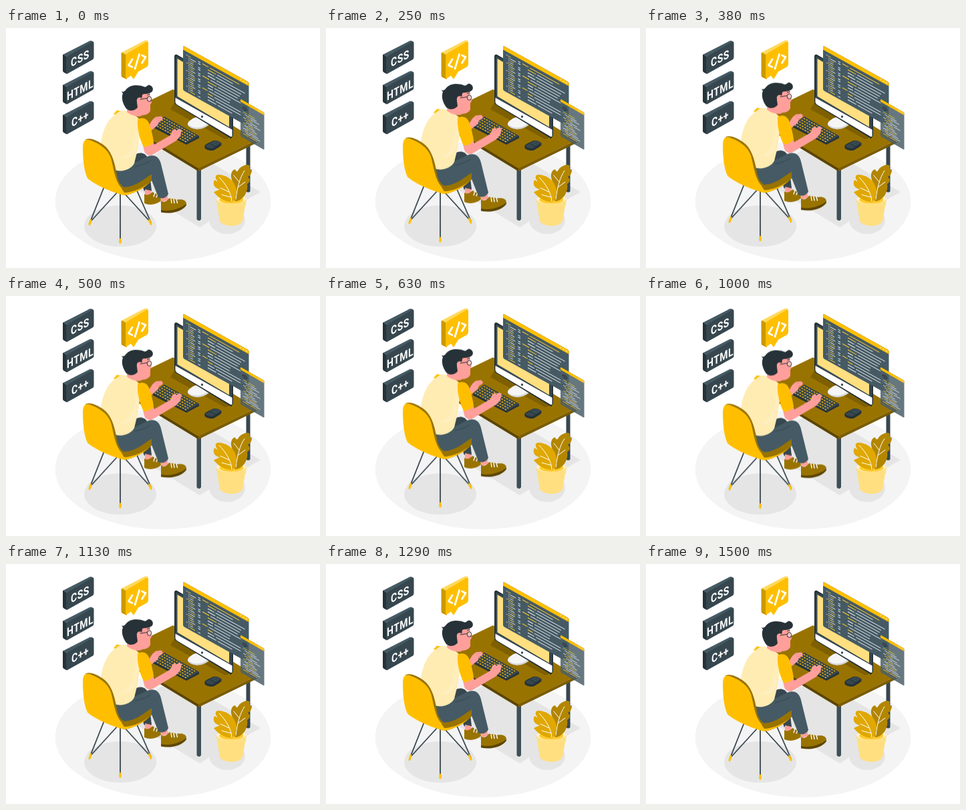
These frames come from a looping animation (470 px wide and 360 px high, 1.54 s). An HTML page:

```html
<!DOCTYPE html>
<html lang="en">
<head>
<meta charset="utf-8">
<title>Developer at a desk</title>
<style>
  html, body { margin: 0; width: 100%; height: 100%; overflow: hidden; background: #fff; }
  svg { display: block; width: 100vw; height: 100vh; }
  text { font: 700 17.500px Roboto, sans-serif; letter-spacing: .6px; fill: #fff; text-anchor: middle; }
  .line { fill: none; stroke-linecap: round; stroke-linejoin: round; }
  .skin { fill: #ff9f9b; }
  #sitter { animation: bob 1540ms -50ms infinite cubic-bezier(.37, 0, .63, 1); }
  @keyframes bob {
    0%, 100% { transform: translateY(0); }
    50% { transform: translateY(-6.5px); }
  }
</style>
</head>
<body>
<svg viewBox="0 0 470 360">
  <defs>
    <g id="tag">
      <path fill="#263238" d="M85 40.500Q85 39 87 40L91 43V69L86.500 66.500Q85 65.500 85 64Z"/>
      <path fill="#455a64" d="M86 39.500L125 19.500Q128 18 131 21L91 43Z"/>
      <path fill="#37474f" d="M90 45Q90 43 92 42L129 21Q131.500 20 131.500 22.500V44Q131.500 46.500 129.500 47.500L92 68.500Q90 69.500 90 67Z"/>
    </g>
  </defs>

  <g id="floor">
    <ellipse cx="235" cy="260" rx="161.500" ry="90" fill="#f4f4f4"/>
    <g fill="#e5e5e5">
      <path d="M165 223L255 171L381 246L307 288L290 299Z"/>
      <ellipse cx="171" cy="297" rx="54" ry="31"/>
      <ellipse cx="331" cy="288" rx="27" ry="21"/>
    </g>
  </g>

  <g id="tags">
    <use href="#tag"/>
    <use href="#tag" y="45.500"/>
    <use href="#tag" y="90.500"/>
    <text transform="matrix(.8 -.42 0 1 111 51.500)">CSS</text>
    <text transform="matrix(.8 -.42 0 1 111 98.500)">HTML</text>
    <text transform="matrix(.8 -.42 0 1 111 142)">C++</text>
  </g>

  <g id="bubble">
    <path fill="#cc9900" d="M172.500 38Q172.500 36 175 37L181 40V77L174 74Q172.500 73 172.500 71Z"/>
    <path fill="#ffd95c" d="M173.500 36.500L207 19Q210 17.500 213 20L181 41Z"/>
    <path fill="#ffbf00" d="M179 42Q179 39.500 181 38.500L210 21Q213 19.500 213 22V54Q213 57 210.500 58.500L198 65.500L191 77L187 71.500L181 75.500Q179 76.500 179 74Z"/>
    <path class="line" stroke="#fff" stroke-width="2.700" d="M189 47L183.500 56L189 58.500M199.500 39.500L193 61M203.500 41L209 43.500L203.500 52.500"/>
  </g>

  <g id="desk">
    <path fill="#37474f" d="M359.500 175H365.500V245Q362.500 248 359.500 245Z"/>
    <path fill="#3e4f57" d="M285.500 205H292V287Q289 291 285.500 287Z"/>
    <path fill="#5c4500" d="M163 134L288 210V215L163 139Z"/>
    <path fill="#7a5c00" d="M288 210L375 168V172.500L288 215Z"/>
    <path fill="#997300" d="M250 92L375 168L288 210.500L163 134Z"/>
    <path fill="#7a5c00" d="M252 112L338 163L328 167L246 122Z" opacity=".8"/>
  </g>

  <g id="monitor">
    <path fill="#d5d5d5" d="M272 146Q271 142 280 137L298 133Q306 138 305 144.500Q296 152 286 152Q276 151 272 146Z"/>
    <path fill="#f5f5f5" d="M272 144Q272 140 281 135L297 130Q306 137 305 142Q294 150 285 149.500Q276 149 272 144Z"/>
    <path fill="#263238" d="M252 43Q252 39 256 40L336 87Q340 89 340 94V161L337 166L254 115Q252 113 252 110Z"/>
    <path fill="#37474f" d="M254 45Q254 42 257 43L335 89Q338 91 338 95V154L254 105Z"/>
    <path fill="#ffdf80" d="M256.500 46L334 92V148.500L256.500 102.500Z"/>
    <path fill="#fff" d="M253.500 104.500L338.500 152.500V161.500Q338 164 335.500 162.500L256 115Q253.500 113.500 253.500 111Z"/>
    <circle cx="293.500" cy="133" r="1.700" fill="#37474f"/>
  </g>

  <g id="editor" transform="matrix(1 .557 0 1 265 26.500)">
    <rect width="98.500" height="67" rx="2" fill="#455a64"/>
    <path fill="#ffbf00" d="M0 6V2Q0 0 2 0H96.500Q98.500 0 98.500 2V6Z"/>
    <path class="line" stroke="#fff" stroke-width="1.500" d="M86 3h.1M90.500 3h.1M95 3h.1"/>
  </g>

  <g id="preview" transform="matrix(1 .575 0 1 351 106.500)">
    <rect width="35.500" height="56" rx="1.500" fill="#4c6069" opacity=".85"/>
    <path fill="#ffbf00" d="M0 4V1.500Q0 0 1.500 0H34Q35.500 0 35.500 1.500V4Z"/>
    <path class="line" stroke="#fff" stroke-width="1.100" d="M27 2h.1M30 2h.1M33 2h.1"/>
    <path class="line" stroke="#263238" d="M5 9l-2 2l2 2M7 8l-1 6M8 9l2 2l-2 2"/>
  </g>

  <g id="keyboard">
    <path fill="#263238" d="M220 146L237 133L289 162V165L270 175L220 149Z"/>
    <path fill="#37474f" d="M220 146L237 133L289 162L270 172.500Z"/>
  </g>

  <g id="mouse">
    <path fill="#263238" d="M297 178Q297 176 300 174L310 169Q316 167.500 322 172Q324 175 320 178L311 183.500Q303 185 298 181Z"/>
    <path fill="#37474f" d="M298 177L310 169.500Q316 168 322 172.500L310 180Q303 181 298 177Z"/>
    <path class="line" stroke="#263238" d="M304 173L314 178"/>
  </g>

  <g id="plant">
    <path fill="#ffdf80" d="M315 257L320 290C326 299 350 299 354 290L360 256Z"/>
    <ellipse cx="337.500" cy="257" rx="22.500" ry="8" fill="#fff0c2"/>
    <ellipse cx="337.500" cy="258" rx="18" ry="5.500" fill="#ffca2c"/>
    <path fill="#b38600" d="M343 260C336 247 336 239 340 232C335 224 336 213 343 212C345 217 347 215 349 211C355 205 363 204 365 207C364 211 365 213 368 212C368 219 365 222 362 223C366 227 366 231 361 234C363 242 358 255 348 259Z"/>
    <path class="line" stroke="#fff" d="M344 257C346 240 350 224 357 214M349 231L341 221M347 239L358 231"/>
    <path fill="#e0a800" d="M331 260C322 257 315 252 311 246L320 242C311 240 309 233 312 228L318 231C312 226 313 221 317 220C330 220 341 228 344 239C347 249 343 257 339 261Z"/>
    <path class="line" stroke="#fff" d="M319 224C329 234 337 247 338 260M334 246L321 240M337 254L323 250"/>
    <path fill="#ffdf80" d="M315 258C322 266 353 266 360 257L359 266C350 274 325 274 316 266Z"/>
  </g>

  <g id="sitter">
    <g id="chair-legs" class="line" stroke="#37474f" stroke-width="1.800">
      <path d="M147 238L125.500 292M171 248V320M196 244L217 292M167 246L126 291M177 248L216 291"/>
      <path stroke="#ffbf00" stroke-width="3.200" d="M127 288.500L125 294.500M171 317V322M214.500 288.500L217 294"/>
    </g>

    <g id="far-leg">
      <path fill="#37474f" d="M188 196C194 186 206 184 212 194L218 244C214 248 209 247 206 243L202 214Z"/>
      <path class="skin" d="M208 242L217 244L218 251H208Z"/>
      <path fill="#997300" d="M207 249C211 252 216 250 219 246L231 252L232 259C224 266 214 266 207 263Z"/>
      <path class="line" stroke="#fff" stroke-width="1.300" d="M221 253L223 247M225 254L227 249"/>
    </g>

    <path id="seat" fill="#997300" d="M158 225L190 206L218 218V229C209 240 190 249 177 251Z"/>

    <g id="near-leg">
      <path class="skin" d="M231 250L241 249L243 258L233 261Z"/>
      <path fill="#997300" d="M232 259C236 263 241 260 244 255.500L258 257.500C265 256.500 270 259 270 264C267 272 249 279 232 275Z"/>
      <path fill="#5c4500" d="M232 273C246 276 261 271 270 264V266C264 275 247 280 232 276.500Z"/>
      <path class="line" stroke="#fff" stroke-width="1.400" d="M248 262.500L247 256.500M252 262.500L251 257M256.500 262.500L255 257"/>
      <path fill="#455a64" d="M160 212C174 211 193 202 207 195C219 188 229 191 232 204L243 249C240 255 234 257 228 254L215 221C204 229 192 238 177 239C168 236 162 225 160 212Z"/>
      <path class="line" stroke="#37474f" d="M193 208C203 206 211 203 216 199"/>
    </g>

    <g id="far-arm">
      <path class="skin" d="M214 146L219 138L224 133.500L232 132.500C235 134 236 137 233 138.500L229 141L227 146L216 155Z"/>
      <path class="line" stroke="#f28f8f" d="M224 136L231 135M225 139L230 139"/>
    </g>

    <g id="torso">
      <path fill="#ffbf00" d="M161 129L166 123.500L179 126L170 133Z"/>
      <path fill="#ffecb3" d="M166 128C154 135 148 147 144 162C139 181 139 193 146 205L166 214C177 216 188 211 192 203C196 188 201 165 201 145C203 137 196 132 183 126C176 122 170 124 166 128Z"/>
      <path fill="#fff2cc" d="M193 151C195 170 188 189 172 196C181 198 187 194 192 188C197 174 200 162 199 150Z" opacity=".5"/>
      <path class="skin" d="M181 123L201 118L204 131C199 135 186 131 181 126Z"/>
    </g>

    <g id="head">
      <path class="skin" d="M199 96L215 95L216 104L218 112L216 115V124C214 130 206 132 200 130L190 124Z"/>
      <path fill="#263238" d="M172.500 95C175 97 178 95 180 92C186 85 198 85 206 88C210 90 212 85 214 85.500C221 87 221 94 218 96C213 100 207 98 204 100L203 107C199 105 196 107 196 112L197 119C194 124 185 126 180 121C175 114 172 105 175 98Z"/>
      <path class="skin" d="M203 105C198 103 195 106 196 111C197 117 203 118 204 114Z"/>
      <path class="line" stroke="#263238" d="M201 107L211 105.500"/>
      <ellipse cx="214.500" cy="106.500" rx="3.200" ry="3.800" fill="#fff" fill-opacity=".35" stroke="#263238"/>
      <path class="line" stroke="#263238" d="M211.500 100.500L215 99.500"/>
    </g>

    <g id="near-arm">
      <path class="skin" d="M205 176L220 170L222 175L246 161L249 154L253 151L255 154L259 151L263 153L261 162L255 169L223 188C216 193 210 192 207 185Z"/>
      <path class="line" stroke="#f28f8f" d="M250 158L255 155M253 161L260 155"/>
      <path fill="#ffbf00" d="M197 137C205 133 211 136 214 143C218 153 220 164 221 171C217 176 211 179 206 178C200 168 196 150 197 137Z"/>
    </g>

    <g id="chair">
      <path fill="#997300" d="M119 167.500C126 163.500 138 169.500 146 175.500C157 183.500 162 199 165 215C167 228 170 235 177 239C192 239 207 230 218 219V229C209 240 190 249 177 251C164 246 145 229 134 216Z"/>
      <path fill="#ffbf00" d="M115 180C115 170 118 166 125 168C139 173 152 181 157 195C162 213 163 233 177 244C193 243 208 234 218 224V228C209 240 191 249 177 251C160 247 134 236 122 225.500C117 215 115 198 115 180Z"/>
      <path fill="#997300" d="M173 241C191 240 207 231 218 220V229C208 239 190 247 177 247Z"/>
    </g>
  </g>
</svg>

<script>
  const NS = 'http://www.w3.org/2000/svg';
  const find = id => document.getElementById(id);
  let seed = 7;
  const rand = () => (seed = seed * 16807 % 2147483647) / 2147483647;

  function stroke(parent, d, color, width) {
    const path = document.createElementNS(NS, 'path');
    Object.entries({ d, stroke: color, 'stroke-width': width, fill: 'none' })
      .forEach(([key, value]) => path.setAttribute(key, value));
    parent.append(path);
  }

  function codeLine(parent, x, y, length, color, width = .9) {
    stroke(parent, `M${x} ${y}h${length}`, color, width);
  }

  const yellow = '#ffca2c', white = '#e8ecee';
  const editor = find('editor'), preview = find('preview'), keyboard = find('keyboard');

  // File list, line numbers and code
  for (let i = 0; i < 19; i++) {
    const y = 11 + i * 2.9;
    const indent = 5 + (i % 4 ? 3 : 0);
    codeLine(editor, indent, y, 1.5, white);
    codeLine(editor, indent + 2.5, y, 4 + rand() * 5, i % 2 ? white : yellow);
    if (i % 3 < 2) codeLine(editor, 22.5, y, 3.5, white, 1.1);
  }
  for (let i = 0; i < 12; i++) {
    const y = 11 + i * 4.5;
    const x = 29 + (i % 4 ? 8 : 0);
    const lead = 5 + rand() * 9;
    codeLine(editor, x, y, lead, i % 4 < 2 ? yellow : white, 1.1);
    codeLine(editor, x + lead + 2, y, 20 + rand() * 26, i ? white : yellow, 1);
  }

  for (let i = 0; i < 13; i++) {
    const y = 17 + i * 2.7;
    const x = 4 + (i % 3) * 2;
    const lead = 4 + rand() * 7;
    codeLine(preview, x, y, lead, i % 2 ? white : yellow, .7);
    codeLine(preview, x + lead + 1.5, y, 5 + rand() * 9, i % 3 ? white : yellow, .7);
  }

  for (let row = 0; row < 5; row++) {
    for (let key = 0; key < 13; key++) {
      const x = 236 + key * 3.75 - row * 3.35;
      const y = 135.5 + key * 2.03 + row * 2.45;
      stroke(keyboard, `M${x} ${y}l2.100 1.150`, '#ffbf00', 1.3);
    }
  }
</script>
</body>
</html>
```
